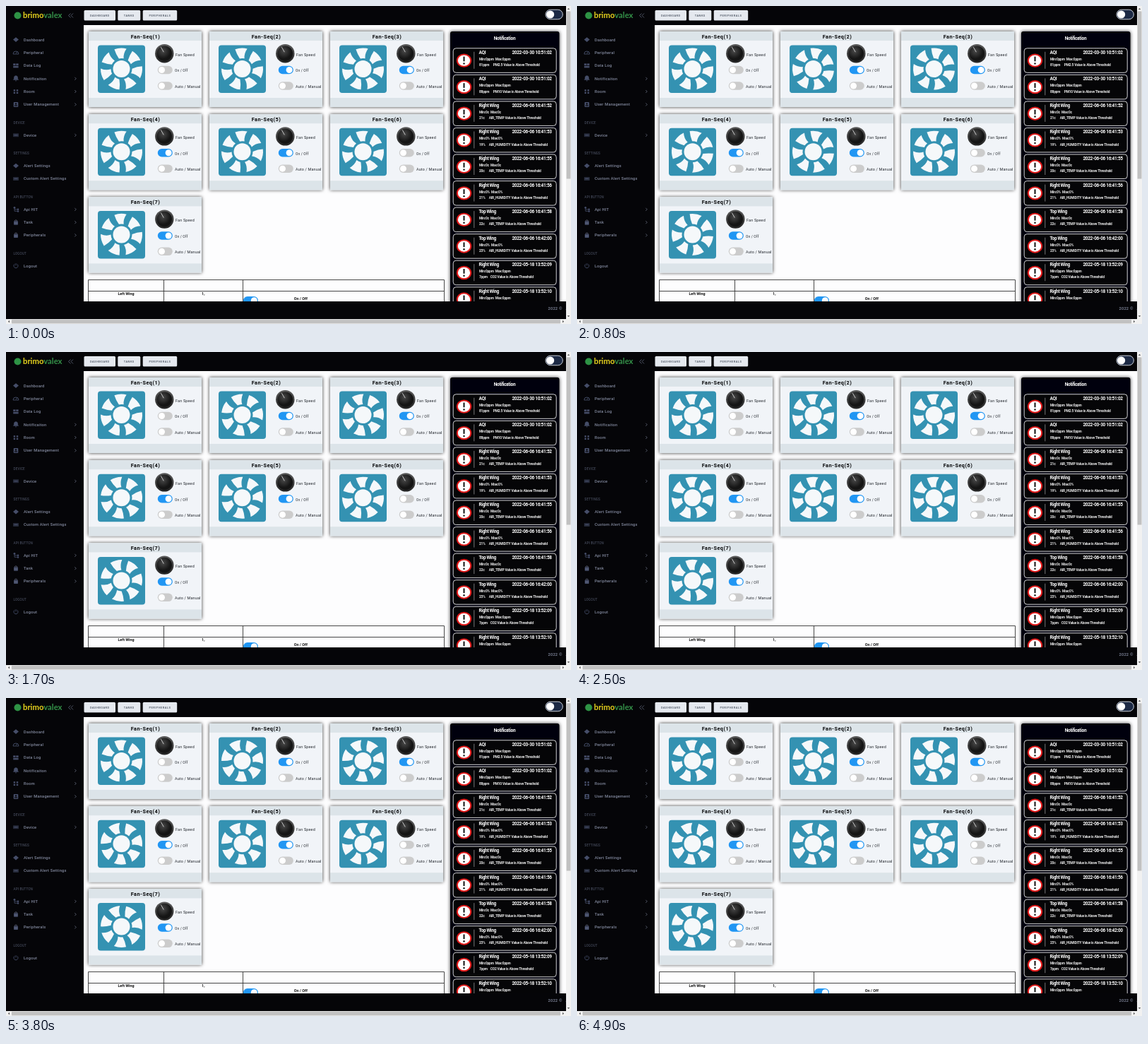
An HTML page for the animation above (5 s loop, 800x450 px).

```html
<!DOCTYPE html>
<html lang="en">
<head>
<meta charset="utf-8">
<title>Fan dashboard</title>
<style>
html, body { margin: 0; width: 100%; height: 100%; overflow: hidden; background: #050508; }
svg { display: block; width: 100vw; height: 100vh; font-family: Roboto, Arial, sans-serif; }
text { white-space: pre; }
.nav { font-size: 5.7px; font-weight: 500; letter-spacing: .22px; fill: #848ba0; }
.head { font-size: 4.6px; letter-spacing: .15px; fill: #535a6e; }
.tab { font-size: 4px; font-weight: 500; letter-spacing: .45px; fill: #4c5563; }
.title { font-size: 7.3px; font-weight: 700; letter-spacing: .5px; fill: #08090b; }
.label { font-size: 5.4px; letter-spacing: .2px; fill: #22262c; }
.small { font-size: 4.8px; letter-spacing: .2px; fill: #22262c; }
.cell { font-size: 5.4px; font-weight: 700; fill: #111; }
.note { font-size: 6.5px; font-weight: 700; letter-spacing: -.33px; fill: #fff; }
.info { font-size: 4.9px; font-weight: 700; letter-spacing: -.19px; fill: #eee; }
</style>
</head>
<body>
<svg id="stage" viewBox="0 0 800 450" preserveAspectRatio="none"></svg>
<script>
const stage = document.getElementById('stage');
const TEAL = '#3492b2', LOOP = 5000, STEP = 100, TURN = 2500;

const rect = (x, y, w, h, fill, more = '') =>
  `<rect x="${x}" y="${y}" width="${w}" height="${h}" fill="${fill}" ${more}/>`;
const circle = (x, y, r, fill, more = '') =>
  `<circle cx="${x}" cy="${y}" r="${r}" fill="${fill}" ${more}/>`;
const path = (d, stroke, width = 1, fill = 'none') =>
  `<path d="${d}" stroke="${stroke}" stroke-width="${width}" fill="${fill}"/>`;
const text = (x, y, s, cls, anchor = 'start') =>
  `<text x="${x}" y="${y}" class="${cls}" text-anchor="${anchor}">${s}</text>`;
const polar = (r, deg) => {
  const a = deg * Math.PI / 180;
  return `${(r * Math.sin(a)).toFixed(2)} ${(-r * Math.cos(a)).toFixed(2)}`;
};

function toggle(x, y, on) {
  return rect(x, y, 21, 11.5, on ? '#2196f3' : '#ccc', 'rx="5.75"') +
    circle(x + (on ? 15.3 : 5.7), y + 5.75, 4.5, '#fff');
}

function knob(x, y) {
  return circle(x, y, 13.2, 'url(#rim)') + circle(x, y, 10.8, 'url(#cap)') +
    path(`M${x - 5} ${y - 9}L${x - 1} ${y - 2}`, '#d5d5d5', .9);
}

function fan(x, y, on) {
  const blade = `M${polar(15, -14)}Q${polar(22, -21)} ${polar(29.5, -20)}` +
    `A29.5 29.5 0 0 1 ${polar(29.5, 14)}Q${polar(22, 6)} ${polar(15, 12)}A15 15 0 0 0 ${polar(15, -14)}Z`;
  let blades = '';
  for (let i = 0; i < 7; i++)
    blades += `<path d="${blade}" fill="#f5f8fa" transform="rotate(${i * 360 / 7})"/>`;
  return rect(x - 33.5, y - 33.5, 67, 67.5, TEAL, 'rx="4"') +
    `<g transform="translate(${x} ${y})">` +
    `<g ${on ? 'class="spin"' : ''}>${blades}</g>` + circle(0, 0, 12, '#f5f8fa') + '</g>';
}

function card(i) {
  const x = 117 + i % 3 * 171, y = 36 + Math.floor(i / 3) * 117.2;
  const on = i !== 0 && i !== 5;
  return rect(x, y, 160, 107, '#f1f4f8', 'filter="url(#shadow)"') +
    rect(x, y, 160, 13, '#dce4e9') + rect(x, y + 94, 160, 13, '#dce4e9') +
    text(x + 80.5, y + 9.6, `Fan-Seq(${i + 1})`, 'title', 'middle') +
    fan(x + 46.5, y + 53, on) + knob(x + 107.3, y + 31.2) +
    text(x + 123, y + 34.8, 'Fan Speed', 'label') +
    toggle(x + 97.8, y + 48.8, on) + text(x + 122, y + 57.3, 'On / Off', 'small') +
    toggle(x + 97.8, y + 71.2, false) + text(x + 122, y + 80, 'Auto / Manual', 'label');
}

function icon(y, kind) {
  const c = '#454d68', x = 14;
  if (kind === 0) return path(`M${x} ${y - 3.5}l4 3.2-4 3.7-4-3.7z`, 'none', 0, c);
  if (kind === 1) return path(`M${x - 4} ${y + 2}a4 4 0 1 1 8 0zM${x} ${y + 1}l2-2`, c, .9);
  if (kind === 2) return rect(x - 3.8, y - 3, 3.3, 2.6, c) + rect(x + .3, y - 3, 3.3, 2.6, c) +
    rect(x - 3.8, y + .4, 7.4, 2.6, c);
  if (kind === 3) return path(`M${x - 3.5} ${y + 1.5}q1.5-1 1-3a2.5 2.5 0 0 1 5 0q-.5 2 1 3zM${x - 1} ${y + 3}h2`, c, .8, c);
  if (kind === 4) return [-2.8, .7].map(d =>
    rect(x - 3.3, y + d, 2.4, 2.4, c) + rect(x + .8, y + d, 2.4, 2.4, c)).join('');
  if (kind === 5) return rect(x - 3.3, y - 3.5, 6.6, 7, c, 'rx="1"') +
    circle(x, y - 1, 1.2, '#050508') + rect(x - 2, y + 1, 4, 1.2, '#050508');
  if (kind === 6) return rect(x - 4, y - 2.5, 8, 5, '#252a39', 'rx=".7"') +
    path(`M${x - 2.5} ${y}h5`, c, 1.2);
  if (kind === 7) return path(`M${x - 2} ${y - 2}v4.5h4M${x - 2} ${y}h4`, c, .8) +
    circle(x - 2, y - 2.5, 1.4, c) + circle(x + 3, y, 1.3, c) + circle(x + 3, y + 2.7, 1.3, c);
  if (kind === 8) return rect(x - 3, y - 2, 6, 5.5, c, 'rx="1"') +
    path(`M${x - 2} ${y - 2.3}q2-2.5 4 0M${x - 1.8} ${y + 1}h3.6`, '#6c7389', .7);
  return path(`M${x - 1.5} ${y - 2.7}a3 3 0 1 0 3 0M${x} ${y - 3.5}v3`, c, .9);
}

// label, y, icon (-1 marks a heading), has submenu
const menu = [
  ['Dashboard', 47.7, 0], ['Peripheral', 66, 1], ['Data Log', 84.4, 2],
  ['Notificaiton', 102.8, 3, 1], ['Room', 121, 4, 1], ['User Management', 139.4, 5, 1],
  ['DEVICE', 165.3, -1], ['Device', 182.8, 6, 1],
  ['SETTINGS', 208.8, -1], ['Alert Settings', 226.2, 0], ['Custom Alert Settings', 244.4, 6],
  ['API BUTTON', 270.2, -1], ['Api HIT', 287.8, 7, 1], ['Tank', 306.2, 8, 1], ['Peripherals', 324.4, 8, 1],
  ['LOGOUT', 350.3, -1], ['Logout', 367.8, 9]
];

function menuItem([label, y, kind, sub]) {
  if (kind < 0) return text(10.5, y + 1.6, label, 'head');
  return icon(y, kind) + text(25, y + 2, label, 'nav') +
    (sub ? path(`M97.3 ${y - 2}l2 2-2 2`, '#747b90', .7) : '');
}

// name, time, limits, reading, message
const march = '2022-03-30 10:51:02', june = '2022-06-06 16:4', may = '2022-05-18 13:52:';
const ppm = 'Min:0ppm  Max:0ppm', deg = 'Min:0c  Max:0c', pct = 'Min:0%  Max:0%';
const notes = [
  ['AQI', march, ppm, '81ppm', 'PM2.5'], ['AQI', march, ppm, '88ppm', 'PM10'],
  ['Right Wing', june + '1:52', deg, '21c', 'AIR_TEMP'],
  ['Right Wing', june + '1:53', pct, '19%', 'AIR_HUMIDITY'],
  ['Right Wing', june + '1:55', deg, '20c', 'AIR_TEMP'],
  ['Right Wing', june + '1:56', pct, '21%', 'AIR_HUMIDITY'],
  ['Top Wing', june + '1:58', deg, '22c', 'AIR_TEMP'],
  ['Top Wing', june + '2:00', pct, '23%', 'AIR_HUMIDITY'],
  ['Right Wing', may + '09', ppm, '7ppm', 'CO2'],
  ['Right Wing', may + '10', ppm, '8ppm', 'CO2']
];

function note([name, time, limits, value, kind], i) {
  const y = 59.8 + i * 37.55, messageX = 670 + (value.endsWith('ppm') ? value.length * 4 - .3 : 13.7);
  return rect(633.2, y, 146, 34.5, '#050507', 'rx="4" stroke="#e8e8e8" stroke-width=".9"') +
    `<ellipse cx="648.5" cy="${y + 17.3}" rx="9.7" ry="8.7" fill="#fff" stroke="#e11919" stroke-width="2"/>` +
    path(`M648.5 ${y + 11.8}v6.7`, '#111', 2) + circle(648.5, y + 21.6, 1.2, '#111') +
    path(`M662.8 ${y + 5}v24`, '#aaa', .7) +
    text(669.5, y + 8, name, 'note') + text(772.7, y + 8, time, 'note', 'end') +
    text(670, y + 17, limits, 'info') + text(670, y + 25.2, value, 'info') +
    text(messageX, y + 25.2, kind + ' Value is Above Threshold', 'info');
}

function tab(x, w, label) {
  return rect(x, 6, w, 14.5, '#e5e9ef', 'rx="1.5"') + text(x + w / 2, 14.9, label, 'tab', 'middle');
}

function scrollbars() {
  const arrow = d => path(d, 'none', 0, '#555');
  return rect(793, 0, 7, 450, '#f1f1f1') + rect(0, 443, 800, 7, '#f1f1f1') +
    rect(793.6, 7.5, 5.8, 237, '#c1c1c1') + rect(8, 443.7, 777, 5.6, '#c1c1c1') +
    arrow('M794.8 5l1.7-2 1.7 2z') + arrow('M794.8 438l1.7 2 1.7-2z') +
    arrow('M5 444.8l-2 1.7 2 1.7z') + arrow('M788 444.8l2 1.7-2 1.7z');
}

stage.innerHTML = `<defs>
  <filter id="shadow" x="-10%" y="-12%" width="120%" height="124%">
    <feDropShadow dx="0" dy="0" stdDeviation="2.8" flood-color="#000" flood-opacity=".8"/>
  </filter>
  <radialGradient id="cap" cx=".4" cy=".35"><stop stop-color="#484848"/><stop offset="1" stop-color="#151515"/></radialGradient>
  <linearGradient id="rim" x2="0" y2="1"><stop stop-color="#5a5a5a"/><stop offset="1" stop-color="#222"/></linearGradient>
  <clipPath id="page"><rect x="110" y="27" width="683" height="391"/></clipPath>
</defs>` +
  rect(0, 0, 800, 450, '#050508') +
  circle(16.5, 13.5, 5, '#2e9345') +
  '<text x="24" y="17.3" font-family="Lato, sans-serif" font-size="11.3" font-weight="700" fill="#e9d51e">brimo<tspan fill="#35944a">valex</tspan></text>' +
  path('M91.5 10.5l-3 3 3 3M95 10.5l-3 3 3 3', '#626a80', .8) +
  menu.map(menuItem).join('') +
  tab(110.5, 44.5, 'DASHBOARD') + tab(158.3, 32, 'TANKS') + tab(193.7, 48.5, 'PERIPHERALS') +
  rect(764, 5.2, 24.3, 13.6, '#1d2a45', 'rx="6.8" stroke="#dfe5ee" stroke-width=".9"') +
  circle(770.6, 12, 5.6, '#fff') +
  '<g clip-path="url(#page)">' + rect(110, 27, 683, 391, '#fdfdfe') +
  [...Array(7).keys()].map(card).join('') +
  path('M116.5 420V387.5H620.5V420M116.5 403.5H620.5M223.5 387.5V420M335.5 387.5V420', '#333', .9) +
  text(170, 409.3, 'Left Wing', 'cell', 'middle') + text(279.3, 409.3, '1,', 'cell', 'middle') +
  toggle(336, 411, true) + text(417.3, 416, 'On / Off', 'cell', 'middle') +
  rect(629, 36, 154.5, 390, '#050507', 'rx="3" filter="url(#shadow)"') +
  text(706, 47.8, 'Notification', 'note', 'middle') + notes.map(note).join('') + '</g>' +
  text(767.5, 429.8, '2022 ©   A', 'nav') + scrollbars();

const spinning = stage.querySelectorAll('.spin');
function draw(now) {
  const t = Math.floor(now % LOOP / STEP) * STEP;
  spinning.forEach(g => g.setAttribute('transform', `rotate(${t / TURN * 360})`));
  requestAnimationFrame(draw);
}
draw(performance.now());
</script>
</body>
</html>
```
